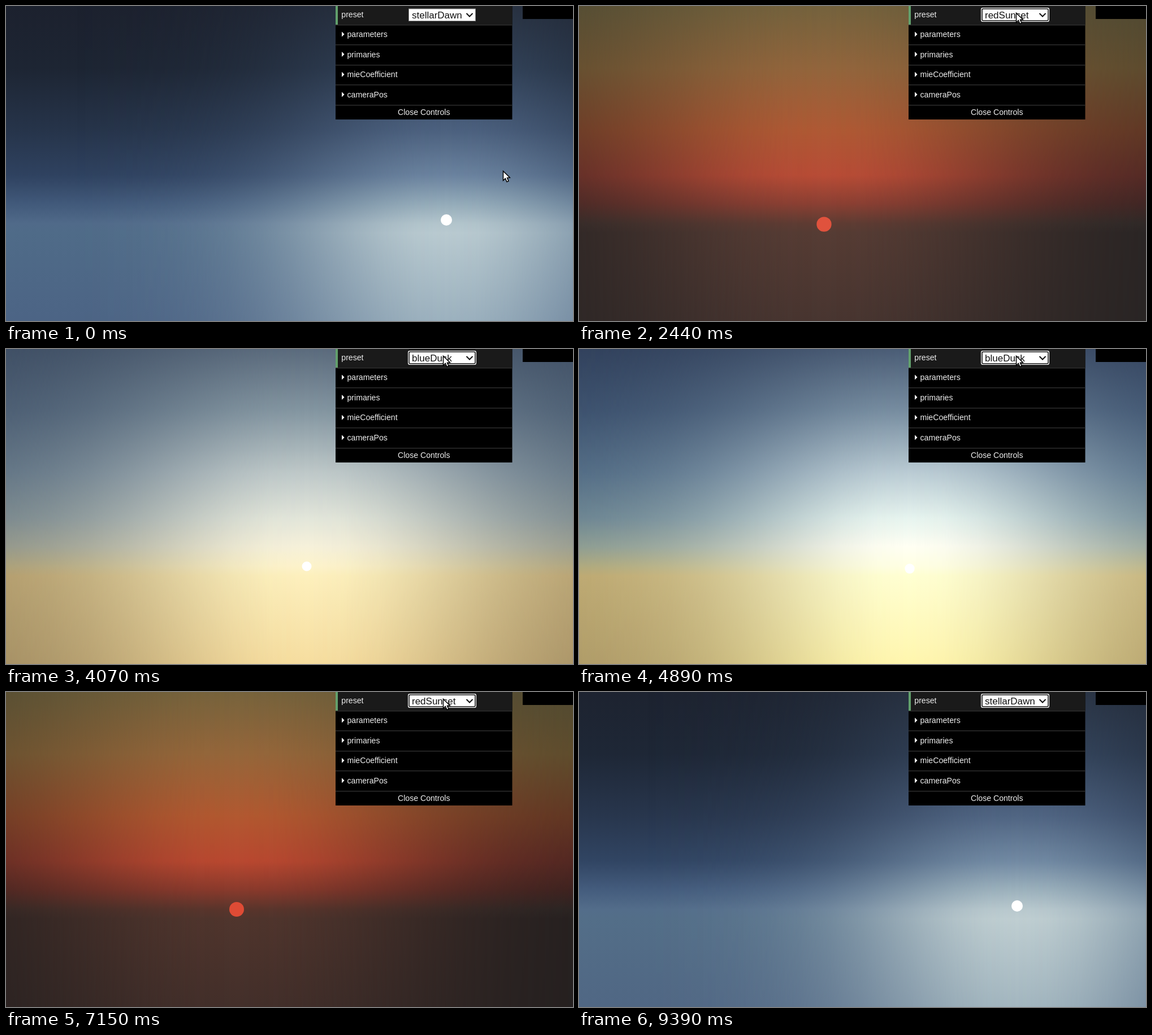
These frames come from a looping animation (1003 by 558 pixels, 9.6 s). An HTML page with a canvas:

```html
<!DOCTYPE html>
<html lang="en">
<head>
<meta charset="utf-8">
<title>Sky presets</title>
<style>
  html, body { margin: 0; width: 100%; height: 100%; overflow: hidden; background: #000; }
  canvas { display: block; width: 1003px; height: 558px; }
</style>
</head>
<body>
<canvas id="stage" width="1003" height="558"></canvas>
<script>
const W = 1003, H = 558, LOOP = 9600, STEPS = 47;
const ctx = document.getElementById('stage').getContext('2d');
const layer = Object.assign(document.createElement('canvas'), { width: W, height: H });
const glow = layer.getContext('2d');
const FONT = '"Liberation Sans", Arial, sans-serif';

// Heights of the sky's colour stops, from zenith past the horizon to the bottom
const STOPS = [0, 110, 220, 300, 350, 385, 402, 558];

const rgb = hex => hex.split(' ').flatMap(c => [0, 2, 4].map(i => parseInt(c.substr(i, 2), 16)));
const mix = (a, b, k) => a.map((v, i) => v + (b[i] - v) * k);
const css = (a, i) => `rgb(${a.slice(i, i + 3).map(v => Math.round(Math.max(0, Math.min(255, v))))})`;

// Flat state: sun x, y, radius, glow width, sun colour, colours above the sun, colours far from it
const sky = (x, y, r, width, sun, near, far) => [x, y, r, width, ...rgb(sun), ...rgb(near), ...rgb(far)];
const NEAR = 7, FAR = NEAR + STOPS.length * 3;

const dawn = sky(779, 379, 10, 300, 'ffffff',
  '2a3444 34455c 4c617f 6b839f 94abb9 b3c5cc b9cad0 9cb1be',
  '1c212e 1d2533 26344a 2f4260 41597a 506a89 4f6b88 4c6485');
const paleDawn = sky(757, 379, 10, 300, 'ffffff',
  '34465e 405470 647c97 9cb0bb c8d2cf dde2d8 dfe3d6 c9d0c4',
  '222c3e 26344a 30425f 3f5677 526d8b 66808f 6b8088 66777f');
const amber = sky(343, 367, 10.8, 450, 'c98a58',
  'a3a183 b8a97b c99d66 c07d56 aa604e 83544b 79564c 6d5049',
  '7b8375 84836b 967a56 95644a 84493f 5e4340 4e4040 4a3c3d');
const gold = sky(532, 385, 8.5, 350, 'ffffff',
  '5b6b7d 8496a1 bfc9c9 e3e6da f6f1da fdf3cb fdf0bd f6dd9f',
  '3d4d63 485a70 5c6f80 728187 8b9084 a39872 ad9768 9f8a60');
const peach = sky(391.5, 370, 8, 450, 'ebe3bb',
  'b2beba ccd0c4 ddd7bc e0c48f d3a36d b98260 b17a60 a8735c',
  '7c8f97 8a9792 9a9b88 a79672 a7805f 8a6050 7c5448 744f45');
const ember = sky(408, 385, 13, 380, 'df4b35',
  '77633c 95663a b25830 b94830 8a3a2c 5a352c 50352d 432f2a',
  '4e4830 5a4a2c 5a3422 4a2521 38211f 272322 231f1f 231f1f');

const place = (s, x, y, r) => [x, y, r, ...s.slice(3)];
const alien = place(mix(amber, peach, .5), 330, 364, 8.5);
const dusk = place(mix(alien, gold, 1.2), 585, 389, 8.7);
const red = place(ember, 420, 387, 13.3);
const settled = place(mix(dawn, paleDawn, .15), 775, 379, 10);

// [step, sky]
const keys = [
  [0, dawn], [7, dawn], [8, paleDawn], [13, red], [16, amber], [18, alien], [20, gold],
  [24, dusk], [26, dusk], [29, peach], [32, alien], [35, ember], [40, red], [46, settled]
];
const labels = [
  [0, 'stellarDawn'], [8, 'redSunset'], [13, 'alienDay'], [18, 'blueDusk'],
  [26, 'alienDay'], [32, 'redSunset'], [40, 'stellarDawn']
];
const pointer = [
  [0, 879, 292], [1, 862, 252], [2, 828, 172], [3, 792, 92], [4, 773, 50],
  [6, 773, 12], [42, 858, 99], [43, -99, -99]
];

const latest = (list, n) => list.filter(e => e[0] <= n).pop();

function skyAt(n) {
  const i = keys.findIndex(k => k[0] >= n);
  const [end, to] = keys[i];
  if (end === n) return to;
  const [start, from] = keys[i - 1];
  const left = 1 - (n - start) / (end - start);
  return mix(from, to, 1 - left ** (end === 46 ? 3 : 2));
}

function column(c, s, offset) {
  const g = c.createLinearGradient(0, 0, 0, H);
  STOPS.forEach((y, i) => g.addColorStop(y / H, css(s, offset + i * 3)));
  c.fillStyle = g;
  c.fillRect(0, 0, W, H);
}

function drawSky(s) {
  const [x, y, r, width] = s;
  column(ctx, s, FAR);
  glow.globalCompositeOperation = 'source-over';
  glow.clearRect(0, 0, W, H);
  column(glow, s, NEAR);
  const reach = width * 2.2;
  const fade = glow.createLinearGradient(x - reach, 0, x + reach, 0);
  for (let i = 0; i <= 24; i++) {
    const d = (i / 12 - 1) * 2.2;
    fade.addColorStop(i / 24, `rgba(0,0,0,${i % 24 ? Math.exp(-d * d) : 0})`);
  }
  glow.globalCompositeOperation = 'destination-in';
  glow.fillStyle = fade;
  glow.fillRect(0, 0, W, H);
  ctx.drawImage(layer, 0, 0);
  disc(x, y, r, css(s, 4));
}

function disc(x, y, r, color) {
  ctx.fillStyle = color;
  ctx.beginPath();
  ctx.arc(x, y, r, 0, 7);
  ctx.fill();
}

function box(x, y, w, h, color) {
  ctx.fillStyle = color;
  ctx.fillRect(x, y, w, h);
}

function text(str, x, y, size, color) {
  ctx.font = `${size}px ${FONT}`;
  ctx.fillStyle = color;
  ctx.fillText(str, x, y);
}

function poly(points) {
  ctx.beginPath();
  points.forEach(([x, y]) => ctx.lineTo(x, y));
}

function drawPanel(label, focused) {
  box(914, 0, 89, 23, '#000');
  box(583, 0, 312.5, 201, '#000');
  box(583, 0, 312.5, 33, '#1a1a1a');
  box(583, 0, 4, 33, '#62a06c');
  text('preset', 593.3, 20, 14.1, '#eee');
  ['parameters', 'primaries', 'mieCoefficient', 'cameraPos'].forEach((name, i) => {
    const y = 50 + i * 35.6;
    box(583, Math.round(y - 17.5), 312.5, 1.4, '#303030');
    poly([[594, y - 4.5], [598.5, y], [594, y + 4.5]]);
    ctx.fillStyle = '#fff';
    ctx.fill();
    text(name, 603.5, Math.round(y + 5), 14.1, '#eee');
  });
  box(583, 175, 312.5, 1.4, '#303030');
  text('Close Controls', 693, 192.5, 14.1, '#eee');

  if (focused) {
    ctx.fillStyle = '#fff';
    ctx.beginPath();
    ctx.roundRect(711, 3, 121, 25, 3);
    ctx.fill();
    ctx.strokeStyle = '#111';
    ctx.lineWidth = 1.6;
    ctx.beginPath();
    ctx.roundRect(713, 5, 117, 21, 2);
    ctx.stroke();
  } else {
    box(712, 4.5, 119, 22.5, '#888');
    box(713, 5.5, 117, 20.5, '#fff');
  }
  text(label, 718, 21.5, 17, '#111');
  poly([[814.5, 13], [820, 18.5], [825.5, 13]]);
  ctx.strokeStyle = '#111';
  ctx.lineWidth = 2;
  ctx.stroke();
}

function drawPointer(x, y) {
  ctx.save();
  ctx.translate(x, y);
  poly([[0.5, 0.5], [0.5, 17], [4.3, 13.6], [7, 19.5], [10, 18.2], [7.5, 12.4], [12.3, 12]]);
  ctx.closePath();
  ctx.fillStyle = '#fff';
  ctx.fill();
  ctx.strokeStyle = '#000';
  ctx.lineWidth = 1.5;
  ctx.stroke();
  ctx.restore();
}

function draw(now) {
  // The picture advances in even steps of about 204 ms
  const n = Math.floor(((now % LOOP) + 20) * STEPS / LOOP) % STEPS;
  const [, x, y] = latest(pointer, n);
  drawSky(skyAt(n));
  drawPanel(latest(labels, n)[1], n >= 6);
  if (n === 8) disc(x, y + 1, 16, 'rgba(236,212,50,.8)');
  drawPointer(x, y);
}

const began = performance.now();
function tick() {
  draw(performance.now() - began);
  requestAnimationFrame(tick);
}
tick();
</script>
</body>
</html>
```
